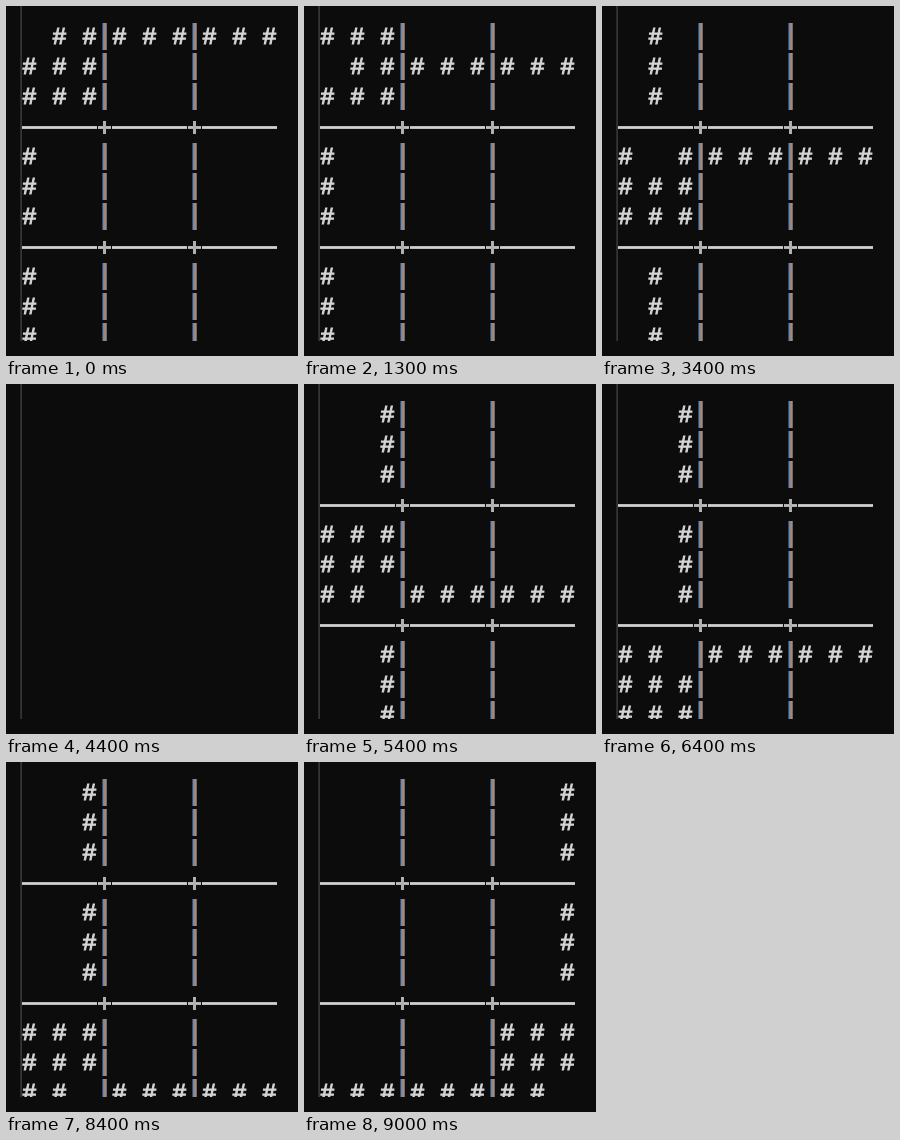
These frames come from a looping animation (292x350 px, 9100 ms). An HTML page:

```html
<!DOCTYPE html>
<html lang="en">
<head>
<meta charset="utf-8">
<title>Sudoku peers</title>
<style>
  html, body { margin: 0; width: 100%; height: 100%; overflow: hidden; background: #0c0c0c; }
  svg { display: block; }
  #board { filter: blur(.65px); }
  text {
    font: 24px "Liberation Mono", "DejaVu Sans Mono", monospace;
    text-anchor: middle;
    fill: #d4d4d4;
    stroke: #d4d4d4;
    stroke-width: 1.1px;
  }
</style>
</head>
<body>
<svg width="292" height="350" viewBox="0 0 292 350">
  <clipPath id="console"><rect width="292" height="335"/></clipPath>
  <rect x="14.5" width="1.2" height="335" fill="#484848"/>
  <g clip-path="url(#console)"><g id="board"></g></g>
</svg>
<script>
const LOOP = 9100, HOLD = 400, STEP = 100;
const CELL_W = 15, LINE_H = 30, LEFT = 16;
const board = document.getElementById("board");

function add(tag, attrs) {
  const el = document.createElementNS("http://www.w3.org/2000/svg", tag);
  for (const key in attrs) el.setAttribute(key, attrs[key]);
  return board.appendChild(el);
}

const rect = (x, y, width, height, fill) => add("rect", { x, y, width, height, fill });
const band = i => Math.floor(i / 3);
const centerX = col => LEFT + CELL_W * (2 * col + .5);
const centerY = row => LINE_H * (1 + row + band(row));

// Column bars, with the colour fringe of subpixel text
for (const x of [98.5, 188.5]) {
  for (let row = 0; row < 9; row++) {
    const y = centerY(row) - 13;
    rect(x - 2, y, 4, 27, "#6888b8");
    rect(x, y, 2, 27, "#b08868");
  }
}

// Row separators
for (const y of [121.5, 241.5]) {
  for (const x of [16, 106, 196]) rect(x, y - 1.4, 75, 2.8, "#d0d0d0");
  for (const x of [98.5, 188.5]) {
    rect(x - 6.5, y - 1.4, 13, 2.8, "#c0c0c0");
    rect(x - 1.5, y - 6.5, 3, 13, "#b0b0b0");
  }
}

const marks = Array.from({ length: 81 }, (_, i) => {
  const row = Math.floor(i / 9), col = i % 9;
  const el = add("text", { x: centerX(col), y: centerY(row) + 8 });
  el.textContent = "#";
  return { el, row, col };
});

function isPeer(a, b) {
  return a !== b && (a.row === b.row || a.col === b.col ||
    (band(a.row) === band(b.row) && band(a.col) === band(b.col)));
}

// The screen is caught empty once every 12.5 steps
const blanksUpTo = step => Math.max(0, Math.ceil((step - 3) / 12.5));

let shown = -1;
function show(step) {
  if (step === shown) return;
  shown = step;
  const blanks = blanksUpTo(step);
  const empty = step > 0 && blanks > blanksUpTo(step - 1);
  board.style.display = empty ? "none" : "";
  if (empty) return;
  const current = marks[step - blanks];
  for (const mark of marks) {
    mark.el.style.display = isPeer(mark, current) ? "" : "none";
  }
}

const start = performance.now();
function frame() {
  const t = (performance.now() - start) % LOOP;
  show(t < HOLD ? 0 : Math.floor((t - HOLD) / STEP) + 1);
  requestAnimationFrame(frame);
}
show(0);
requestAnimationFrame(frame);
</script>
</body>
</html>
```
